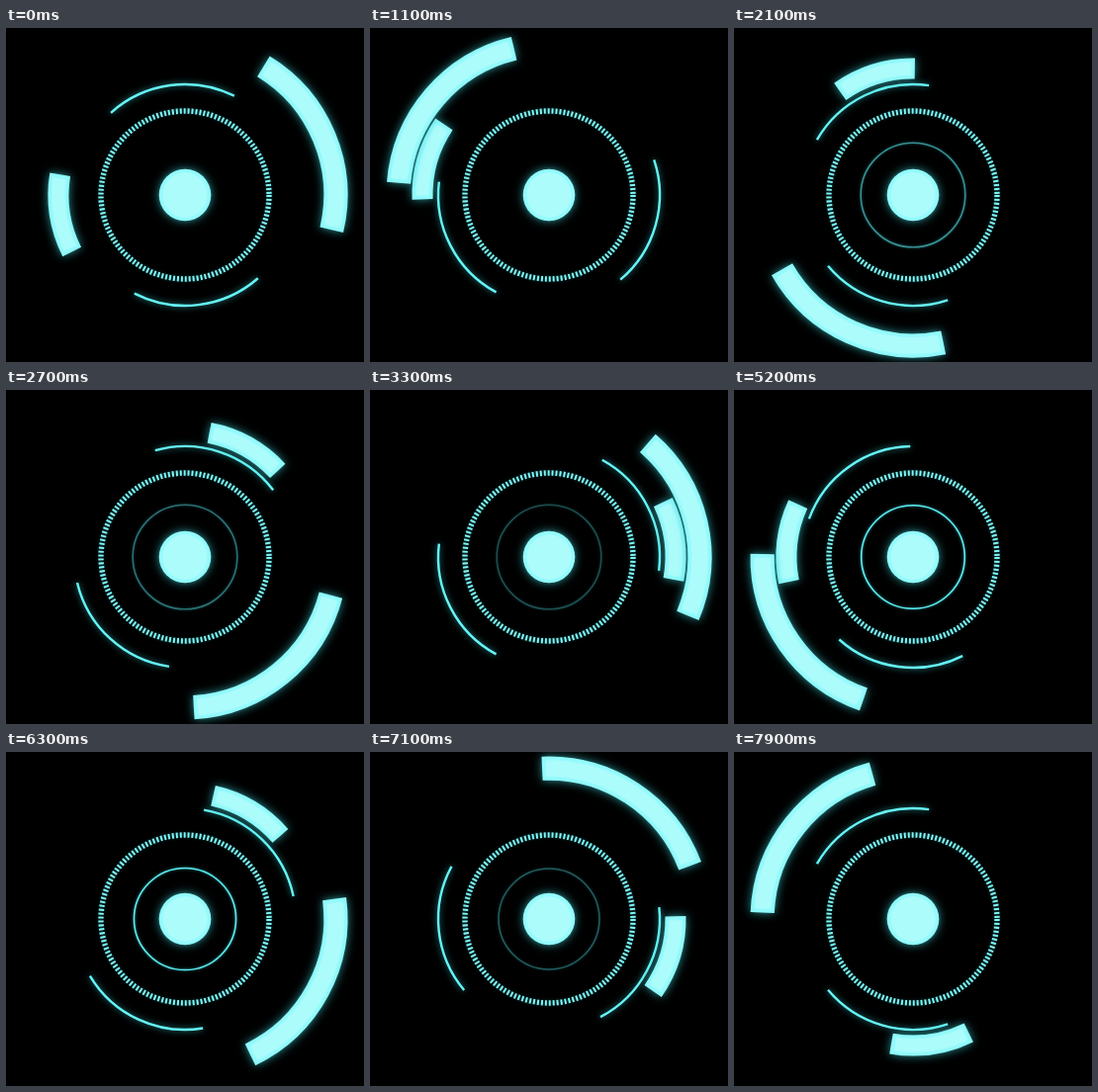
These frames come from a looping animation (362x338 px, 8000 ms). An HTML page with a canvas:

```html
<!DOCTYPE html>
<html lang="en">
<head>
<meta charset="utf-8">
<title>Rotating dial</title>
<style>
html, body { margin: 0; width: 100%; height: 100%; overflow: hidden; background: #000; }
canvas { display: block; }
</style>
</head>
<body>
<canvas id="dial" width="362" height="338"></canvas>
<script>
const ctx = document.getElementById('dial').getContext('2d');
const LOOP = 8, STEP = 0.1;
const LINE = '#66f5f6', EDGE = '#8cf9fb', CORE = '#acfcfb', GLOW = 'rgba(60, 205, 212, 0.7)';

// Turning angles of the two thin arcs: [seconds, degrees]
const thinA = [[0, 262.2], [1.1, 375.7], [2.1, 465.9], [3.3, 512.7], [5.2, 594.4], [6.3, 674], [7.9, 825.9]];
const thinB = [[0, 83], [1.1, 152.7], [2.1, 244.1], [3.3, 332.9], [4.5, 440], [5.2, 457.6], [6.3, 474.9], [7.9, 604.1]];
const ringFade = [[0, 0], [1.6, 0], [2.1, 0.55], [3.3, 0.28], [4.6, 1], [6.5, 1], [7.4, 0], [8, 0]];

const rad = deg => deg * Math.PI / 180;
const clamp = x => Math.min(1, Math.max(0, x));
const ease = x => { x = clamp(x); return x * x * (3 - 2 * x); };

function segment(keys, t) {
  const i = keys.findIndex(k => k[0] > t);
  return (i < 0 ? keys.length - 1 : i) - 1;
}

function linear(keys, t) {
  const i = segment(keys, t), [t0, v0] = keys[i], [t1, v1] = keys[i + 1];
  return v0 + (v1 - v0) * clamp((t - t0) / (t1 - t0));
}

// Smooth curve through the keys (cubic Hermite)
function smooth(keys, t) {
  const i = segment(keys, t), [t0, v0] = keys[i], [t1, v1] = keys[i + 1];
  const slope = j => {
    const a = keys[Math.max(0, j - 1)], b = keys[Math.min(keys.length - 1, j + 1)];
    return (b[1] - a[1]) / (b[0] - a[0]);
  };
  const d = t1 - t0, u = (t - t0) / d, w = 1 - u;
  return v0 * (1 + 2 * u) * w * w + v1 * u * u * (3 - 2 * u)
    + d * u * w * (slope(i) * w - slope(i + 1) * u);
}

function stroke(r, width, from, to, color, blur, glow) {
  ctx.beginPath();
  ctx.arc(0, 0, r, rad(from), rad(to));
  ctx.lineWidth = width;
  ctx.strokeStyle = color;
  ctx.shadowBlur = blur;
  ctx.shadowColor = glow;
  ctx.stroke();
}

function thickArc(r, width, mid, span) {
  const half = span / 2, inset = 240 / r;
  stroke(r, width, mid - half, mid + half, EDGE, 10, GLOW);
  stroke(r, width - 8, mid - half + inset, mid + half - inset, CORE, 5, CORE);
}

function thinArc(mid) {
  stroke(112, 2.4, mid - 34.2, mid + 34.2, LINE, 6, GLOW);
}

function disc(r, color, blur, glow) {
  ctx.beginPath();
  ctx.arc(0, 0, r, 0, 7);
  ctx.fillStyle = color;
  ctx.shadowBlur = blur;
  ctx.shadowColor = glow;
  ctx.fill();
}

function dottedRing() {
  const pitch = 2 * Math.PI * 85 / 134;
  ctx.setLineDash([pitch / 2, pitch / 2]);
  stroke(85, 5.4, 0, 360, '#7cf8f8', 3, 'rgba(60, 205, 212, 0.4)');
  ctx.setLineDash([]);
}

function innerRing(t) {
  ctx.globalAlpha = linear(ringFade, t);
  stroke(52.8 - 0.7 * Math.max(0, t - 4.5), 1.6, 0, 360, '#5cecf0', 3, GLOW);
  ctx.globalAlpha = 1;
}

function draw(t) {
  ctx.setTransform(1, 0, 0, 1, 0, 0);
  ctx.shadowBlur = 0;
  ctx.fillStyle = '#000';
  ctx.fillRect(0, 0, 362, 338);
  ctx.translate(181, 169);
  dottedRing();
  innerRing(t);
  thinArc(smooth(thinA, t));
  thinArc(smooth(thinB, t));
  thickArc(128, 21, 171.3 + 720 * ease((t + 0.03) / 10.17), 36);
  thickArc(152.4, 24.2, -22.6 - 106.2 * t, 72);
  disc(26.3, EDGE, 10, GLOW);
  disc(22.5, CORE, 5, CORE);
}

const start = performance.now();
function tick() {
  const t = (performance.now() - start) / 1000 % LOOP;
  draw(Math.floor(t / STEP + 1e-6) * STEP);
  requestAnimationFrame(tick);
}
tick();
</script>
</body>
</html>
```
